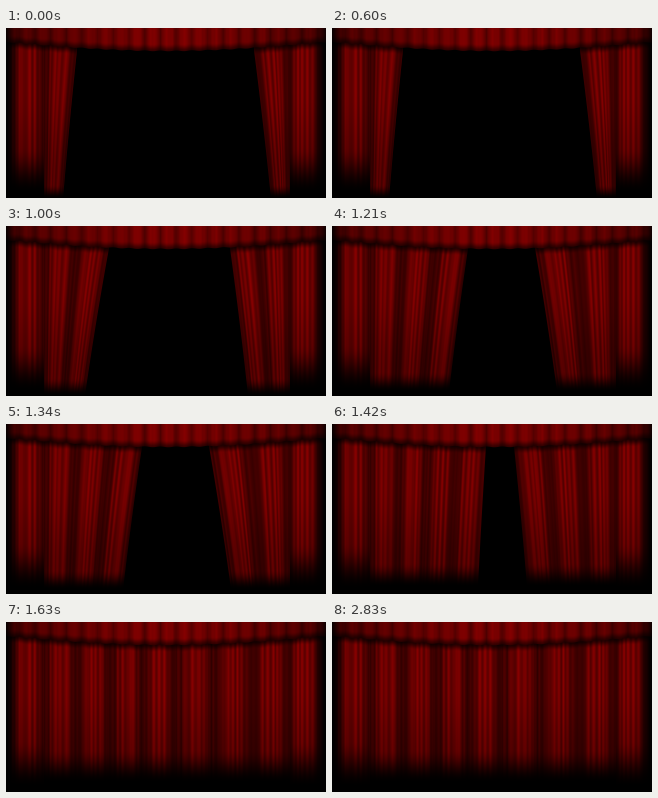
Recreate the animation shown at these times as an HTML page with a canvas. Size 320 by 170 pixels, loop 3630 ms.

```html
<!DOCTYPE html>
<html lang="en">
<head>
<meta charset="utf-8">
<title>Theatre curtain</title>
<style>
  html, body { margin: 0; width: 100%; height: 100%; overflow: hidden; background: #000; }
  canvas { display: block; width: 100vw; height: 100vh; }
</style>
</head>
<body>
<canvas id="stage" width="320" height="170"></canvas>
<script>
const W = 320, H = 170, LOOP = 3630;
const WING_LEFT = 38, WING_RIGHT = 284;
const ctx = document.getElementById('stage').getContext('2d');

// Inner edges are [top x, bottom x]; folds are counted per side.
const poses = [
  { start: 0,    left: [71, 57],   right: [248, 265], hem: 170, fade: 14, folds: [1, 1] },
  { start: 1000, left: [103, 79],  right: [224, 242], hem: 169, fade: 18, folds: [2, 2] },
  { start: 1210, left: [136, 117], right: [203, 225], hem: 165, fade: 20, folds: [3, 2] },
  { start: 1420, left: [154, 146], right: [182, 195], hem: 162, fade: 24, folds: [4, 3] },
  { start: 1630, left: [170, 170], right: [170, 170], hem: 160, fade: 34, folds: [4, 3] }
];

const clamp = (v, lo = 0, hi = 1) => Math.min(hi, Math.max(lo, v));
const mix = (a, b, t) => a + (b - a) * t;
const smooth = (a, b, v) => { const t = clamp((v - a) / (b - a)); return t * t * (3 - 2 * t); };
const wave = v => 0.5 - 0.5 * Math.cos(2 * Math.PI * v);
const hash = n => { const s = Math.sin(n * 127.1 + 11.7) * 43758.5453; return s - Math.floor(s); };
const noise = v => { const i = Math.floor(v); return mix(hash(i), hash(i + 1), smooth(0, 1, v - i)); };

// Brightness of hanging cloth: broad flat folds, narrow pleats and fine threads.
function cloth(u, width, folds, seed, y, hem, fade) {
  const across = u * width;
  const fold = smooth(0, 0.75, wave(u * folds));
  const pleat = wave(across / 5.8 + noise(across / 9 + seed));
  const thread = noise(across / 1.6 + seed) - 0.5;
  const low = smooth(60, 150, y);
  const tone = 58 + 44 * fold + 26 * (pleat - 0.5) * (0.4 + fold) + 20 * thread;
  return Math.max(0, tone * (1.06 - 0.24 * low) * (1 - smooth(hem - fade, hem, y)));
}

function drape(x, y, pose) {
  const t = clamp((y - 22) / (pose.hem - 22));
  const sweep = t + 0.12 * t * (1 - t);
  const left = mix(...pose.left, sweep), right = mix(...pose.right, sweep);
  if (x < WING_LEFT || x > WING_RIGHT) {
    const onLeft = x < W / 2;
    const inset = onLeft ? x : W - x;
    return cloth((inset - 5) / 35, 35, 1, onLeft ? 3 : 80, y, 164, 46) * smooth(0, 13, inset);
  }
  const onLeft = x < (left + right) / 2;
  const span = onLeft ? left - WING_LEFT : WING_RIGHT - right;
  const u = (onLeft ? x - WING_LEFT : WING_RIGHT - x) / span;
  const cover = clamp((1 - u) * span + 0.5);
  if (!cover) return 0;
  const width = onLeft ? pose.left[0] - WING_LEFT : WING_RIGHT - pose.right[0];
  return cover * cloth(u, width, pose.folds[onLeft ? 0 : 1], onLeft ? 20 : 140, y, pose.hem, pose.fade);
}

function valance(x, y) {
  const fold = wave((x + 3) / 15.7);
  const arch = Math.sin(Math.PI * x / W);
  const bottom = 13.5 + 9 * arch + 0.8 * fold;
  const light = 1 - 0.6 * smooth(bottom - 8, bottom, y);
  const side = (0.6 + 0.4 * arch) * smooth(-4, 12, Math.min(x, W - x));
  const tone = (82 + 44 * Math.sqrt(fold) + 14 * (noise(x / 2 + 300) - 0.5)) * light * side;
  return { cover: clamp(bottom - y), tone, bottom };
}

function draw(pose) {
  const image = ctx.createImageData(W, H);
  for (let y = 0; y < H; y++) {
    for (let x = 0; x < W; x++) {
      const top = valance(x, y);
      const shadow = 0.3 + 0.7 * smooth(top.bottom - 1, top.bottom + 7, y);
      const red = mix(drape(x + 0.5, y, pose) * shadow, top.tone, top.cover);
      const i = (y * W + x) * 4;
      image.data[i] = red;
      image.data[i + 3] = 255;
    }
  }
  ctx.putImageData(image, 0, 0);
}

let shown;
function tick() {
  const time = performance.now() % LOOP;
  const pose = poses.findLast(p => p.start <= time);
  if (pose !== shown) draw(shown = pose);
  requestAnimationFrame(tick);
}
tick();
</script>
</body>
</html>
```
